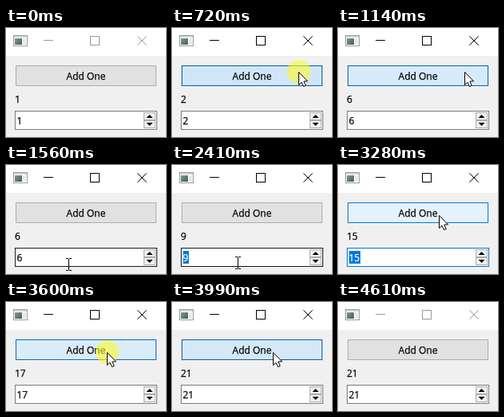
An HTML page with a canvas for the animation above (4.64 s loop, 200 by 137 pixels).

```html
<!DOCTYPE html>
<html lang="en">
<head>
<meta charset="utf-8">
<title>Add One</title>
<style>
  html, body { margin: 0; width: 100%; height: 100%; overflow: hidden; background: #f0f0f0; }
  canvas { display: block; width: 200px; height: 137px; }
</style>
</head>
<body>
<canvas id="stage" width="200" height="137"></canvas>
<script>
const ctx = document.getElementById('stage').getContext('2d');
const FONT = '12px "Open Sans", "Noto Sans", sans-serif';
const LOOP = 4640, HOLD = 60, FADE = 150;
const ACTIVE = [480, 4580];
const FOCUS = [1820, 3365];
const BUTTON_HOVER = [[480, 1300], [2935, 4292]];
const SPIN_HOVER = [[1418, 2826], [4387, 4458]];

const series = (start, gap, count) => Array.from({ length: count }, (_, i) => start + i * gap);
const presses = [...series(550, 120, 5), ...series(3365, 106, 6)];
const wheel = [...series(1820, 210, 3), ...series(2440, 60, 6)];
const steps = [...presses.map(p => p + HOLD), ...wheel];

const HOME = { x: 158, y: 55 };
const moves = [
  { from: 1170, to: 1560, x: 78, y: 125 },
  { from: 1560, to: 1650, x: 82, y: 123 },
  { from: 2750, to: 2930, x: 122, y: 73 },
  { from: 2930, to: 3010, x: 126, y: 63 },
  { from: 4220, to: 4540, x: 160, y: 140 }
];

const clamp = v => Math.max(0, Math.min(1, v));
const ease = v => v * v * (3 - 2 * v);
const within = (t, [a, b]) => t >= a && t < b;
const mix = (a, b, k) => a.map((v, i) => v + (b[i] - v) * k);
const rgb = c => `rgb(${c.map(Math.round).join(',')})`;
const gray = v => [v, v, v];

// 0..1 level that rises after each span starts and falls after it ends
const level = (t, spans, rise, fall) => Math.max(...spans.map(([a, b]) =>
  Math.min(clamp((t - a) / rise), 1 - clamp((t - b) / fall))));

const BLUE = [0, 120, 215];

function rect(x, y, w, h, color) {
  ctx.fillStyle = color;
  ctx.fillRect(x, y, w, h);
}

function box(x, y, w, h, edge, fill) {
  rect(x, y, w, h, edge);
  rect(x + 1, y + 1, w - 2, h - 2, fill);
}

function text(str, x, y, color = '#000', align = 'left') {
  ctx.font = FONT;
  ctx.textAlign = align;
  ctx.fillStyle = ctx.strokeStyle = color;
  ctx.lineWidth = 0.25;
  ctx.fillText(str, x, y);
  ctx.strokeText(str, x, y);
}

function poly(points, fill, stroke) {
  ctx.beginPath();
  points.forEach(([x, y]) => ctx.lineTo(x, y));
  ctx.closePath();
  ctx.fillStyle = fill;
  ctx.fill();
  if (!stroke) return;
  ctx.strokeStyle = stroke;
  ctx.lineWidth = 1;
  ctx.stroke();
}

function pointerAt(t) {
  let { x, y } = HOME;
  for (const m of moves) {
    const k = ease(clamp((t - m.from) / (m.to - m.from)));
    x += (m.x - x) * k;
    y += (m.y - y) * k;
  }
  return { x: Math.round(x), y: Math.round(y) };
}

function titleBar(active) {
  rect(0, 0, 200, 35, '#fff');
  box(9, 9, 18, 14, '#999', '#fff');
  rect(10, 10, 16, 2, '#d4d7d9');
  const shade = ctx.createLinearGradient(11, 13, 19, 21);
  shade.addColorStop(0, '#7d9c98');
  shade.addColorStop(1, '#48625e');
  rect(11, 13, 9, 8, shade);
  rect(21, 13, 4, 8, '#e6e9ec');

  const ink = active ? '#000' : '#999';
  rect(47, 15, 12, 1, ink);
  box(105, 10, 12, 12, ink, '#fff');
  ctx.strokeStyle = ink;
  ctx.lineWidth = 1;
  ctx.beginPath();
  for (const dir of [-1, 1]) {
    ctx.moveTo(170 - 5.7 * dir, 10.3);
    ctx.lineTo(170 + 5.7 * dir, 21.7);
  }
  ctx.stroke();
}

function button(t) {
  const hot = level(t, BUTTON_HOVER, FADE, FADE);
  const down = level(t, presses.map(p => [p, p + HOLD]), HOLD, 110);
  const edge = mix(mix(gray(173), BLUE, hot), [0, 84, 153], down);
  const fill = mix(mix(gray(225), [229, 241, 251], hot), [204, 228, 247], down);
  box(12, 47, 176, 26, rgb(edge), rgb(fill));
  text('Add One', 100, 65, '#000', 'center');
}

function spinBox(t, value) {
  const focus = within(t, FOCUS);
  const hot = level(t, SPIN_HOVER, FADE, FADE);
  box(11, 104, 178, 24, rgb(mix(focus ? BLUE : gray(122), gray(23), hot)), '#fff');
  if (focus) {
    ctx.font = FONT;
    rect(14, 108, Math.round(ctx.measureText(value).width), 16, rgb(BLUE));
  }
  text(value, 13.5, 121, focus ? '#fff' : '#000');
  for (const [y, dir] of [[106, -1], [116, 1]]) {
    box(172, y, 15, 10, '#acacac', '#f0f0f0');
    const base = y + 5 - 2 * dir;
    poly([[175.5, base], [183.5, base], [179.5, base + 4 * dir]], '#000');
  }
}

function arrow(x, y) {
  ctx.save();
  ctx.translate(x + 0.5, y + 0.5);
  poly([[0, 0], [0, 16], [3.5, 12.7], [6, 18], [8.7, 17], [6.3, 11.5], [11, 11.3]], '#fff', '#000');
  ctx.restore();
}

function beam(x, y) {
  rect(x, y - 7, 1, 14, '#000');
  for (const end of [y - 8, y + 7]) {
    rect(x - 3, end, 3, 1, '#000');
    rect(x + 1, end, 3, 1, '#000');
  }
}

function pointer(t) {
  if (t < ACTIVE[0]) return;
  const { x, y } = pointerAt(t);
  if (presses.some(p => within(t, [p, p + HOLD]))) {
    ctx.fillStyle = 'rgba(255,250,40,0.6)';
    ctx.beginPath();
    ctx.arc(x + 0.5, y, 14.7, 0, Math.PI * 2);
    ctx.fill();
  }
  const overText = x < 172 && within(y, [104, 128]);
  (overText ? beam : arrow)(x, y);
}

function draw(t) {
  const value = String(1 + steps.filter(s => s <= t).length);
  rect(0, 0, 200, 137, '#f0f0f0');
  titleBar(within(t, ACTIVE));
  button(t);
  text(value, 11, 94);
  spinBox(t, value);
  pointer(t);
}

let start;
function tick(now) {
  start ??= now;
  draw((now - start) % LOOP);
  requestAnimationFrame(tick);
}
draw(0);
requestAnimationFrame(tick);
</script>
</body>
</html>
```
